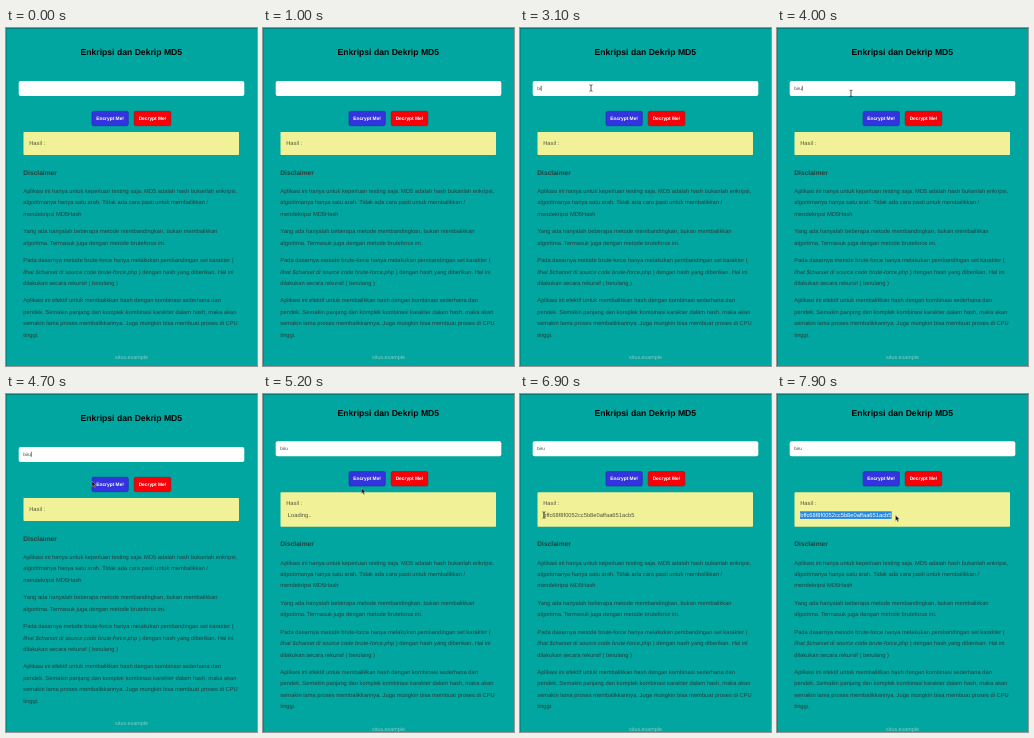
An HTML page that plays this animation: 251 px wide and 338 px high, repeating every 8000 ms.

```html
<!DOCTYPE html>
<html lang="id">
<head>
<meta charset="utf-8">
<title>Enkripsi dan Dekrip MD5</title>
<style>
  html, body { margin: 0; width: 100%; height: 100%; overflow: hidden; background: #00a69f; }
  svg { display: block; width: 100vw; height: 100vh; }
  text { font-family: "Liberation Sans", Arial, sans-serif; font-size: 5.75px; white-space: pre; text-rendering: geometricPrecision; }
  .bold { font-weight: 700; }
  .mid { text-anchor: middle; }
  .button { font-size: 4.85px; fill: #fff; }
  #article { fill: #263f3e; }
  #result text { fill: #55553f; }
  #result #selectedText { fill: #fff; }
</style>
</head>
<body>
<svg id="stage" viewBox="0 0 251 338" xmlns="http://www.w3.org/2000/svg">
  <defs><clipPath id="selectionClip"><rect id="clipRect" x="23" y="116" width="0" height="11"/></clipPath></defs>
  <rect width="251" height="338" fill="#00a69f"/>
  <path d="M0 338V.3H251" fill="none" stroke="#045c5a" stroke-width=".7"/>

  <g id="form">
    <text class="bold mid" x="125.3" y="27.3" style="font-size:8.65px">Enkripsi dan Dekrip MD5</text>
    <rect x="12.7" y="53" width="225.6" height="15" rx="2" fill="#fff"/>
    <text id="typed" x="17.2" y="62" fill="#444" style="font-size:4.6px"></text>
    <path id="caret" d="M0 57.8v5" stroke="#222" stroke-width=".6"/>
    <g stroke-width=".6">
      <rect x="86" y="83.3" width="36.3" height="14.4" rx="1.6" fill="#3434df" stroke="#2525a8"/>
      <rect x="128.2" y="83.3" width="36.6" height="14.4" rx="1.6" fill="#f90008" stroke="#a51018"/>
    </g>
    <text class="button bold mid" x="104.1" y="92.2">Encrypt Me!</text>
    <text class="button bold mid" x="146.5" y="92.2">Decrypt Me!</text>
  </g>

  <g id="result">
    <rect id="box" x="17.5" width="215.5" rx=".8" fill="#f1f197"/>
    <text id="label" x="23.2">Hasil :</text>
    <text id="output" y="123"></text>
    <g clip-path="url(#selectionClip)">
      <rect x="23" y="117.3" width="95" height="7.6" fill="#2388df"/>
      <text id="selectedText" x="23.2" y="123"></text>
    </g>
  </g>

  <g id="article">
    <text class="bold" x="17.3" y="146.8" style="font-size:6.65px">Disclaimer</text>
    <text class="mid" x="125.5" y="331" fill="#8bcbc7" style="font-size:5.4px">situs.example</text>
  </g>

  <path id="ibeam" d="M-1.5-3.2Q0-3.2 0-2.3Q0-3.2 1.5-3.2M0-2.3V2.3M-1.5 3.2Q0 3.2 0 2.3Q0 3.2 1.5 3.2" fill="none" stroke="#222" stroke-width=".75"/>
  <path id="arrow" d="M0 0V5.5L1.3 4.4L2.2 6.4L3.2 6L2.3 4H4Z" fill="#111" stroke="#ddd" stroke-width=".35"/>
</svg>
<script>
const $ = id => document.getElementById(id);
const LOOP = 8000, LOADING_AT = 5000, HASH_AT = 5800, SELECT_AT = 6900;
const HASH = "bffc68f8f0052cc5b8e0affaa651acb5";
const WORD = "biru";
const KEY_TIMES = [2900, 3100, 3400, 3600];

const PARAGRAPHS = [
  ["Aplikasi ini hanya untuk keperluan testing saja. MD5 adalah hash bukanlah enkripsi,",
   "algoritmanya hanya satu arah. Tidak ada cara pasti untuk membalikkan /",
   "mendekripsi MD5Hash"],
  ["Yang ada hanyalah beberapa metode membandingkan, bukan membalikkan",
   "algoritma. Termasuk juga dengan metode bruteforce ini."],
  ["Pada dasarnya metode brute-force hanya melakukan pembandingan set karakter (",
   "_lihat $charset di source code brute-force.php_ ) dengan hash yang diberikan. Hal ini",
   "dilakukan secara rekursif ( berulang )"],
  ["Aplikasi ini efektif untuk membalikkan hash dengan kombinasi sederhana dan",
   "pendek. Semakin panjang dan komplek kombinasi karakter dalam hash, maka akan",
   "semakin lama proses membalikkannya. Juga mungkin bisa membuat proses di CPU",
   "tinggi."]
];

// time, x, y
const POINTER = [
  [1000, 254, 50], [1500, 71, 60], [3800, 71, 60], [4500, 86, 87], [4700, 86, 87],
  [4900, 93, 90], [5000, 93, 90], [5200, 98.5, 94], [5800, 98.5, 94], [6500, 24, 121],
  [SELECT_AT, 24, 121], [7500, 115, 121], [7800, 118.5, 121.3], [LOOP, 118.5, 121.3]
];

function addLine(line, y) {
  const text = document.createElementNS("http://www.w3.org/2000/svg", "text");
  text.setAttribute("x", 17.3);
  text.setAttribute("y", y);
  line.split("_").forEach((part, i) => {
    const span = document.createElementNS("http://www.w3.org/2000/svg", "tspan");
    span.textContent = part;
    if (i % 2) span.setAttribute("font-style", "italic");
    text.append(span);
  });
  $("article").append(text);
}

let lineY = 164.9;
for (const lines of PARAGRAPHS) {
  lines.forEach((line, i) => addLine(line, lineY + i * 11.45));
  lineY += (lines.length - 1) * 11.45 + 17.4;
}
$("selectedText").textContent = HASH;

function pointerAt(t) {
  const next = POINTER.findIndex(p => p[0] > t);
  if (next < 1) return POINTER[0].slice(1);
  const [t0, x0, y0] = POINTER[next - 1], [t1, x1, y1] = POINTER[next];
  const u = (t - t0) / (t1 - t0), k = u * u * (3 - 2 * u);
  return [x0 + (x1 - x0) * k, y0 + (y1 - y0) * k];
}

function show(id, visible) {
  $(id).setAttribute("visibility", visible ? "visible" : "hidden");
}

function selectionWidth(t, x) {
  if (t <= SELECT_AT) return 0;
  const total = $("selectedText").getComputedTextLength();
  const count = Math.min(HASH.length, Math.round((x - 23.2) / total * HASH.length));
  return count > 0 ? $("selectedText").getSubStringLength(0, count) + .4 : 0;
}

function render(time) {
  const t = Math.floor(time % LOOP / 100) * 100;
  const expanded = t >= LOADING_AT, done = t >= HASH_AT;

  $("form").setAttribute("transform", `translate(0 ${expanded ? -5.7 : 0})`);
  $("article").setAttribute("transform", `translate(0 ${expanded ? 5.7 : 0})`);
  $("box").setAttribute("y", expanded ? 98.2 : 104);
  $("box").setAttribute("height", expanded ? 34.6 : 23);
  $("label").setAttribute("y", expanded ? 111.4 : 117.1);
  $("output").setAttribute("x", done ? 23.2 : 24.8);
  $("output").textContent = done ? HASH : expanded ? "Loading.." : "";

  $("typed").textContent = WORD.slice(0, KEY_TIMES.filter(k => k <= t).length);
  $("caret").setAttribute("transform", `translate(${17.7 + $("typed").getComputedTextLength()} 0)`);
  const sinceKey = t - Math.max(1600, ...KEY_TIMES.filter(k => k <= t));
  show("caret", t >= 1600 && !expanded && sinceKey % 1000 < 500 || t === 4700);

  const [x, y] = pointerAt(t);
  const overInput = t >= 1200 && t < LOADING_AT && y > 53 && y < 68;
  const overHash = done && x < 115.5 && y > 117;
  const beam = overInput || overHash;
  show("ibeam", beam);
  show("arrow", !beam && t >= 1000);
  $(beam ? "ibeam" : "arrow").setAttribute("transform", `translate(${x} ${y})`);
  $("clipRect").setAttribute("width", selectionWidth(t, x));
}

const start = performance.now();
function tick(now) {
  render(Math.max(0, now - start));
  requestAnimationFrame(tick);
}
render(0);
requestAnimationFrame(tick);
</script>
</body>
</html>
```
